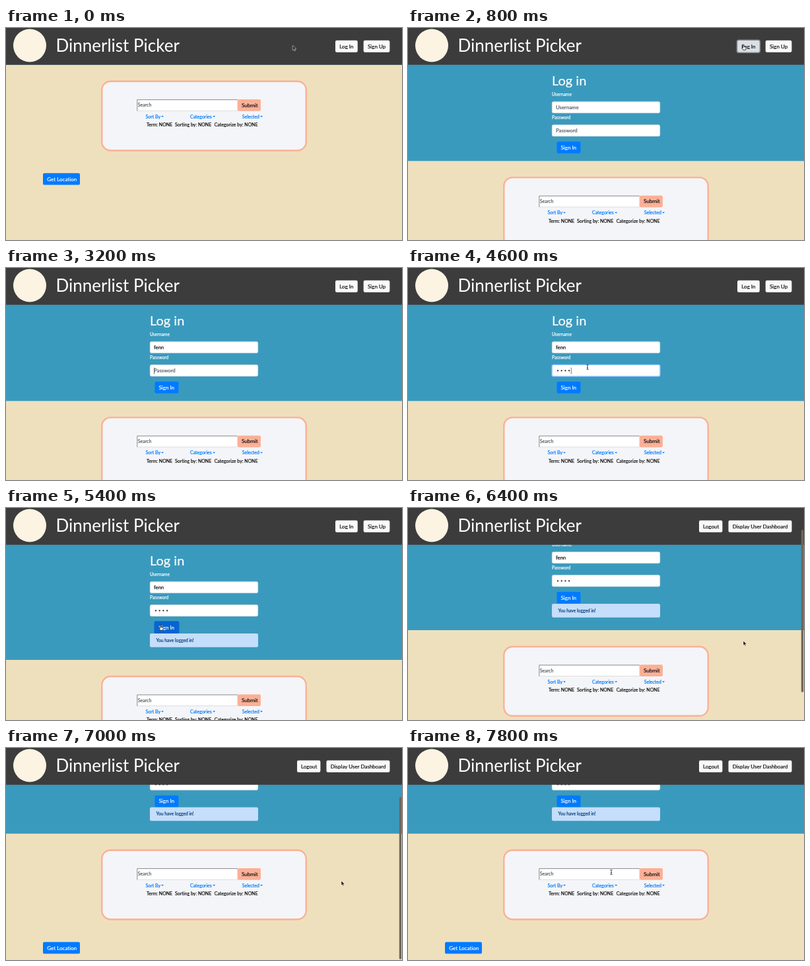
These frames come from a looping animation (600x321 px, 8 s). An HTML page:

```html
<!DOCTYPE html>
<html lang="en">
<head>
<meta charset="utf-8">
<title>Dinner search</title>
<style>
html, body { margin: 0; width: 100%; height: 100%; overflow: hidden; background: #efe0bd; }
svg { display: block; width: 100%; height: 100%; }
text { font: 8px Lato, "Open Sans", sans-serif; stroke-width: .2px; white-space: pre; }
.dark { fill: #111; stroke: #111; }
.light { fill: #fff; stroke: #fff; }
.link { fill: #007bff; stroke: #007bff; }
.hint { fill: #555c63; stroke: #555c63; }
.small text { font-size: 7px; }
.label text { font-size: 6.75px; }
.menu text { font: 6.6px Inter, Roboto, sans-serif; fill: #f4f4f4; }
.field { fill: #fff; stroke: #ced4da; stroke-width: .5px; }
.ring { fill: none; stroke: #80bdff; stroke-width: 1.2px; }
.caret { fill: #222; }

/* One loop is 8 s; 2.5% is one 200 ms step. */
.show, .move { animation: 8s step-end -20ms infinite; }
.show { visibility: hidden; }

@keyframes page {
  from { transform: none }
  7.5% { transform: translateY(82px) }
  10% { transform: translateY(145.7px) }
  67.5%, to { transform: translateY(174.3px) }
}
@keyframes scroll {
  80% { transform: translateY(-45px) }
  82.5% { transform: translateY(-94px) }
  85%, to { transform: translateY(-100.3px) }
}
@keyframes thumb {
  80% { transform: translateY(34px) }
  82.5% { transform: translateY(71px) }
  85%, to { transform: translateY(75px) }
}
@keyframes thumbShow { 80% { visibility: visible } 92.5% { visibility: hidden } }

@keyframes loginFocus { 7.5% { visibility: visible } 20% { visibility: hidden } }
@keyframes nameHint { from { visibility: visible } 27.5% { visibility: hidden } }
@keyframes nameRing { 22.5% { visibility: visible } 40% { visibility: hidden } }
@keyframes nameType {
  27.5% { transform: translateX(2.9px) }
  30% { transform: translateX(7px) }
  32.5% { transform: translateX(11.2px) }
  35%, to { transform: translateX(15.8px) }
}
@keyframes menuAll { 22.5% { visibility: visible } 27.5% { visibility: hidden } }
@keyframes menuSome { 27.5% { visibility: visible } 30% { visibility: hidden } }
@keyframes menuOne { 30% { visibility: visible } 37.5% { visibility: hidden } }

@keyframes passHint { from { visibility: visible } 47.5% { visibility: hidden } }
@keyframes passRing { 42.5% { visibility: visible } 65% { visibility: hidden } }
@keyframes passCaret { 40% { visibility: visible } 65% { visibility: hidden } }
@keyframes passType {
  47.5% { transform: translateX(5.7px) }
  50% { transform: translateX(11.4px) }
  52.5% { transform: translateX(17.1px) }
  55%, to { transform: translateX(22.8px) }
}
@keyframes pressed { 62.5% { visibility: visible } 75% { visibility: hidden } }
@keyframes alert { 67.5% { visibility: visible } }
@keyframes guest { from { visibility: visible } 70% { visibility: hidden } }
@keyframes member { 70% { visibility: visible } }

@keyframes pointer {
  from { transform: translate(434.5px, 26.5px) }
  2.5% { transform: translate(455px, 26px) }
  5% { transform: translate(493px, 28px) }
  7.5%, 10%, 12.5% { transform: translate(509px, 29px) }
  15% { transform: translate(465px, 52px) }
  17.5% { transform: translate(360px, 94px) }
  20% { transform: translate(287px, 115px) }
  57.5% { transform: translate(272px, 150px) }
  60% { transform: translate(243px, 175px) }
  62.5% { transform: translate(235px, 181px) }
  75% { transform: translate(390px, 192px) }
  77.5%, 90% { transform: translate(508px, 201px) }
  92.5% { transform: translate(450px, 199px) }
  95% { transform: translate(350px, 191px) }
  97.5%, to { transform: translate(308px, 188px) }
}
@keyframes arrow {
  from { visibility: visible } 7.5% { visibility: hidden }
  15% { visibility: visible } 20% { visibility: hidden }
  60% { visibility: visible } 62.5% { visibility: hidden }
  75% { visibility: visible } 95% { visibility: hidden }
}
@keyframes hand {
  7.5% { visibility: visible } 15% { visibility: hidden }
  62.5% { visibility: visible } 75% { visibility: hidden }
}
@keyframes beam {
  20% { visibility: visible } 27.5% { visibility: hidden }
  57.5% { visibility: visible } 60% { visibility: hidden }
  95% { visibility: visible }
}
</style>
</head>
<body>
<svg viewBox="0 0 600 321" preserveAspectRatio="none">
  <g class="move" style="animation-name:scroll">
    <rect width="600" height="430" fill="#3a9abd"/>

    <!-- Login form -->
    <g class="light label">
      <text x="218" y="86.7" style="font-size:20px">Log in</text>
      <text x="218" y="103.2">Username</text>
      <text x="218" y="138.3">Password</text>
    </g>
    <rect class="field" x="218.2" y="111.4" width="163.6" height="17.4" rx="2.3"/>
    <text class="dark" x="224" y="123.2" style="font-size:7.8px">fenn</text>
    <g class="move" style="animation-name:nameType">
      <rect x="223.5" y="113.5" width="40" height="13.5" fill="#fff"/>
      <rect class="caret show" x="224" y="115.5" width=".6" height="10" style="animation-name:nameRing"/>
    </g>
    <text class="hint show" x="224" y="123.2" style="font-size:7.8px;animation-name:nameHint">Username</text>
    <rect class="ring show" x="218" y="111.2" width="164" height="17.8" rx="2.5" style="animation-name:nameRing"/>

    <rect class="field" x="218.2" y="146.6" width="163.6" height="17.4" rx="2.3"/>
    <g class="caret">
      <circle cx="227" cy="155.4" r="1.1"/><circle cx="232.7" cy="155.4" r="1.1"/>
      <circle cx="238.4" cy="155.4" r="1.1"/><circle cx="244.1" cy="155.4" r="1.1"/>
    </g>
    <g class="move" style="animation-name:passType">
      <rect x="223.5" y="148.7" width="40" height="13.5" fill="#fff"/>
      <rect class="caret show" x="224" y="150.7" width=".6" height="10" style="animation-name:passCaret"/>
    </g>
    <text class="hint show" x="224" y="158.4" style="font-size:7.8px;animation-name:passHint">Password</text>
    <rect class="ring show" x="218" y="146.4" width="164" height="17.8" rx="2.5" style="animation-name:passRing"/>

    <rect x="225.5" y="172" width="36" height="17.7" rx="2.2" fill="#007bff"/>
    <rect class="show" x="224.5" y="171.3" width="38" height="19" rx="2.5" fill="#0864d0" style="animation-name:pressed"/>
    <text class="light" x="231.5" y="183.5">Sign In</text>
    <g class="show label" style="animation-name:alert">
      <rect x="218" y="190" width="164" height="20.7" rx="2.3" fill="#c4defb"/>
      <text x="227.5" y="202.6" fill="#0b4078" stroke="#0b4078">You have logged in!</text>
    </g>

    <!-- Search page, pushed down as the form opens -->
    <g class="move" style="animation-name:page">
      <rect y="55.7" width="600" height="500" fill="#efe0bd"/>
      <rect x="145.3" y="80.7" width="309.4" height="104.8" rx="13" fill="#f4f5f8" stroke="#fbb097" stroke-width="2.4"/>
      <rect x="198.5" y="108.3" width="152.5" height="17.2" fill="#fff"/>
      <path d="M198.8 125.5V108.6H351" fill="none" stroke="#6d6d6d" stroke-width=".8"/>
      <path d="M198.8 125.3H350.8V108.6" fill="none" stroke="#c8c8c8" stroke-width=".6"/>
      <rect x="351" y="108" width="35" height="17.7" rx="2.3" fill="#fbb097"/>
      <text class="dark" x="357" y="119.6">Submit</text>
      <g class="small">
        <text class="hint" x="199.7" y="119.3">Search</text>
        <g class="link">
          <text x="211.5" y="136.5">Sort By</text>
          <text x="279" y="136.5">Categories</text>
          <text x="357.7" y="136.5">Selected</text>
          <path stroke="none" d="M235 133h4l-2 2zM313.2 133h4l-2 2zM385 133h4l-2 2z"/>
        </g>
        <g class="dark">
          <text x="213" y="149.2">Term: NONE</text>
          <text x="256" y="149.2">Sorting by: NONE</text>
          <text x="315.7" y="149.2">Categorize by: NONE</text>
        </g>
      </g>
      <rect x="56" y="219.7" width="56" height="17.9" rx="2.2" fill="#007bff"/>
      <text class="light" x="62.3" y="231.5">Get Location</text>
    </g>

    <!-- Autofill list, narrowing while typing -->
    <g class="menu">
      <g class="show" style="animation-name:menuAll">
        <rect x="218" y="129.8" width="164" height="108.6" rx="2" fill="#212224"/>
        <text x="224" y="144.1">Fenn</text>
        <text x="224" y="161">fdm481</text>
        <text x="224" y="177.9">Lio</text>
        <text x="224" y="194.8">Tavo</text>
        <text x="224" y="211.7">fdm</text>
        <text x="224" y="228.6">oric</text>
      </g>
      <g class="show" style="animation-name:menuSome">
        <rect x="218" y="129.8" width="164" height="57.9" rx="2" fill="#212224"/>
        <text x="224" y="144.1">Fenn</text>
        <text x="224" y="161">fdm481</text>
        <text x="224" y="177.9">fdm</text>
      </g>
      <g class="show" style="animation-name:menuOne">
        <rect x="218" y="129.8" width="164" height="24.1" rx="2" fill="#212224"/>
        <text x="224" y="144.1">Fenn</text>
      </g>
    </g>
  </g>

  <!-- Header -->
  <rect width="600" height="55.7" fill="#3d3c3d"/>
  <circle cx="36" cy="26.5" r="25" fill="#fdf3e2"/>
  <text x="75.5" y="36.3" fill="#fff" style="font-size:26px">Dinnerlist Picker</text>
  <g class="show" style="animation-name:guest">
    <g fill="#f8f9fa">
      <rect x="499" y="18.8" width="33.8" height="18" rx="2.2"/>
      <rect x="541.7" y="18.8" width="39.7" height="18" rx="2.2"/>
    </g>
  </g>
  <rect class="show" x="498.5" y="18.3" width="34.8" height="19" rx="2.8" fill="#dae0e5" stroke="#8b8d90" stroke-width="1.6" style="animation-name:loginFocus"/>
  <g class="dark show" style="animation-name:guest">
    <text x="505.3" y="30.7">Log In</text>
    <text x="548" y="30.7">Sign Up</text>
  </g>
  <g class="show" style="animation-name:member">
    <g fill="#f8f9fa">
      <rect x="441" y="18.8" width="35.4" height="18" rx="2.2"/>
      <rect x="485.5" y="18.8" width="96" height="18" rx="2.2"/>
    </g>
    <g class="dark">
      <text x="447" y="30.7">Logout</text>
      <text x="491.7" y="30.7">Display User Dashboard</text>
    </g>
  </g>

  <g class="move" style="animation-name:thumb">
    <rect class="show" x="595.8" y="-1" width="3.4" height="246" rx="1.7" fill="#6f675a" style="animation-name:thumbShow"/>
  </g>

  <!-- Mouse pointer -->
  <g class="move" style="animation-name:pointer">
    <path class="show" d="M0 0V7.2L1.7 5.7 2.8 8.2 4 7.6 2.9 5.2H5.2Z" fill="#111" stroke="#fff" stroke-width=".6" style="animation-name:arrow"/>
    <path class="show" d="M-1.4 -3.6Q-.7 -4.3 0 -3.6V-.6L2.4 0Q3.4 .3 3.2 1.5L2.6 4.2H-1.2L-3.2 1.2Q-3 .2 -1.4 1.2Z" fill="#fff" stroke="#111" stroke-width=".8" style="animation-name:hand"/>
    <path class="show" d="M-1.6 -3.6Q0 -3.6 0 -2.6 0 -3.6 1.6 -3.6M0 -2.8V2.8M-1.6 3.6Q0 3.6 0 2.6 0 3.6 1.6 3.6M-1 .9H1" fill="none" stroke="#222" stroke-width=".8" style="animation-name:beam"/>
  </g>
</svg>
</body>
</html>
```
